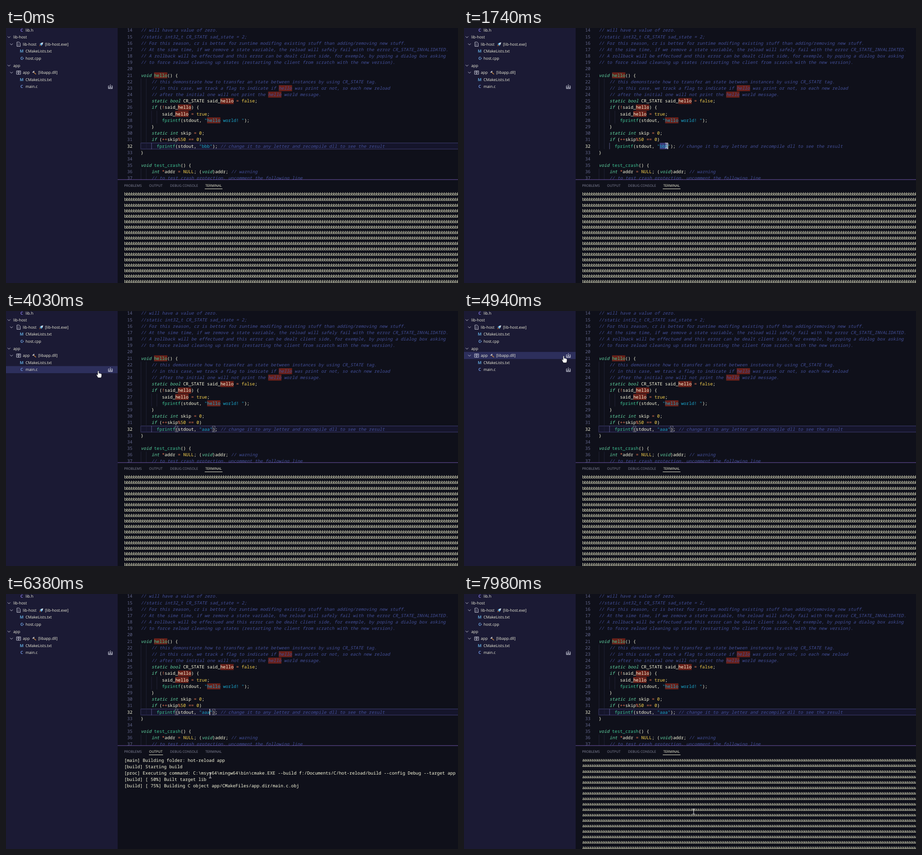
Animation, 996 px wide and 562 px high, one loop 8 s. Source, as an HTML page:

```html
<!DOCTYPE html>
<html lang="en">
<head>
<meta charset="utf-8">
<title>Hot reload</title>
<style>
html, body { margin: 0; width: 100%; height: 100%; overflow: hidden; background: #0f101a; }
svg { display: block; }
text { white-space: pre; text-rendering: geometricPrecision; }
.code { font: 9.747px "Noto Sans Mono", "DejaVu Sans Mono", monospace; fill: #fbfbdf; }
.term { font: 9.2px "Noto Sans Mono", "DejaVu Sans Mono", monospace; letter-spacing: -.556px; fill: #f6f6d2; }
.ui { font: 8.6px "Open Sans", "Noto Sans", sans-serif; fill: #f1f1dc; }
.tab { font: 7.5px "Open Sans", "Noto Sans", sans-serif; fill: #85879c; }
.tab.on { fill: #f6f6dc; }
.num { fill: #62668c; text-anchor: end; }
.num.on { fill: #f6f6dc; }
.com { fill: #434f98; font-style: italic; }
.key { fill: #62d8a4; font-style: italic; }
.fn { fill: #3fc796; }
.str { fill: #1ba6cc; }
.lit { fill: #f4d04e; }
.op { fill: #ee7a55; }
.line { fill: none; stroke: #d5d6e4; stroke-width: .9; }
.match { fill: none; stroke: #8b8ca0; stroke-width: .8; }
</style>
</head>
<body>
<svg id="stage" width="996" height="562" viewBox="0 0 996 562">
  <defs>
    <clipPath id="editorClip"><rect x="246" width="750" height="334"/></clipPath>
    <g id="build" class="line">
      <path d="M-2.5-1.5H-4.5V4.5H4.5V-1.5H2.5M0-5V1M-2-1L0 1.2L2-1M-4.5 2.2H4.5M-2.5 3.4H-1M1 3.4H2.5"/>
    </g>
  </defs>
</svg>
<script>
const LOOP = 8000, X0 = 297, CW = 5.848, LH = 14.17, SIDE = 246;
const svg = document.getElementById('stage');

function add(parent, tag, attrs = {}, text) {
  const el = document.createElementNS('http://www.w3.org/2000/svg', tag);
  for (const k in attrs) el.setAttribute(k, attrs[k]);
  if (text !== undefined) el.textContent = text;
  parent.appendChild(el);
  return el;
}
const rect = (p, x, y, width, height, attrs) => add(p, 'rect', { x, y, width, height, ...attrs });
const label = (p, cls, x, y, text) => add(p, 'text', { class: cls, x, y }, text);
const show = (el, on) => el.setAttribute('display', on ? 'inline' : 'none');
const place = (el, x, y) => el.setAttribute('transform', `translate(${x} ${y})`);
const colX = c => X0 + c * CW;
const lineTop = n => 253 + LH * (n - 32);

// ---- Editor ----
const source = `// will have a value of zero.
//static int32_t CR_STATE sad_state = 2;
// For this reason, cr is better for runtime modifing existing stuff than adding/removing new stuff.
// At the sime time, if we remove a state variable, the reload will safely fail with the error CR_STATE_INVALIDATED.
// A rollback will be effectued and this error can be dealt client side, for exemple, by poping a dialog box asking
// to force reload cleaning up states (restarting the client from scratch with the new version).

void hello() {
    // this demonstrate how to transfer an state between instances by using CR_STATE tag.
    // in this case, we track a flag to indicate if hello was print or not, so each new reload
    // after the initial one will not print the hello world message.
    static bool CR_STATE said_hello = false;
    if (!said_hello) {
        said_hello = true;
        fprintf(stdout, "hello world! ");
    }
    static int skip = 0;
    if (++skip%50 == 0)
      fprintf(stdout, "bbb"); // change it to any letter and recompile dll to see the result
}

void test_crash() {
    int *addr = NULL; (void)addr; // warning
    // to test crash protection, uncomment the following line`.split('\n');

const tokens = [
  ['com', /^\/\/.*/], ['str', /^"[^"]*"/], ['key', /^(void|static|bool|int|if)\b/],
  ['fn', /^\w+(?=\()/], ['lit', /^(true|false|NULL|\d+)\b/], ['op', /^[+%=!*]+/],
  ['', /^\w+/], ['', /^./]
];
function highlight(line, text) {
  while (text) {
    for (const [cls, re] of tokens) {
      const m = text.match(re);
      if (!m) continue;
      add(line, 'tspan', { class: cls }, m[0]);
      text = text.slice(m[0].length);
      break;
    }
  }
}

const editor = add(svg, 'g', { 'clip-path': 'url(#editorClip)' });
const active = rect(editor, X0, 0, 705, LH - .6, { fill: '#15152b', stroke: '#46437f', 'stroke-width': .9 });
const selection = rect(editor, colX(23), lineTop(32), CW * 3, LH, { fill: '#3b3a78' });
const nums = {};
source.forEach((raw, i) => {
  const n = 14 + i, y = lineTop(n), text = raw.trim(), indent = raw.length - raw.trimStart().length;
  for (let c = 0; c < indent; c += 2)
    rect(editor, colX(c), y, .8, LH, { fill: n === 32 && c === 4 ? '#6d6ca6' : '#25263d' });
  if (n < 30)
    for (const m of raw.matchAll(/hello/g))
      rect(editor, colX(m.index), y + .6, CW * 5, LH - 1, { fill: '#6a2019' });
  nums[n] = label(editor, 'code num', 278.6, y + 10.5, n);
  highlight(add(editor, 'text', { class: 'code', x: colX(indent), y: y + 10.5 }), text);
});
const typed = [...editor.querySelectorAll('.str')].pop();
const box = (c, n) => rect(editor, colX(c), lineTop(n) + .8, CW, LH - 1.6, { class: 'match' });
const braces = [box(13, 21), box(0, 33)];
const parens = [box(13, 32), box(27, 32)];
const caret = rect(editor, 0, 0, 1.3, LH - .6, { fill: '#ffffe8' });

// ---- Side bar ----
const side = add(svg, 'g');
rect(side, 0, 0, SIDE, 562, { fill: '#1b1a34' });
const hover = rect(side, 0, 0, SIDE, 15.6, { fill: '#2d2f5c' });
const tree = [
  ['lib.h', 43, 4.5, 'C', '#7d72d6'], ['lib-host', 16, 20], ['lib-host', 37, 35.6], ['[lib-host.exe]', 86, 35.6],
  ['CMakeLists.txt', 43, 51.2, 'M', '#5d9fd0'], ['host.cpp', 43, 66.9, 'C', '#6d9fdc'], ['app', 16, 82.5],
  ['app', 37, 98], ['[libapp.dll]', 71, 98], ['CMakeLists.txt', 43, 113.7, 'M', '#5d9fd0'], ['main.c', 43, 129.2, 'C', '#6d8fd8']
];
for (const [name, x, y, icon, fill] of tree) {
  label(side, 'ui', x, y + 3, name);
  if (icon) add(side, 'text', { class: 'ui', x: 34.5, y: y + 3.2, 'text-anchor': 'middle',
    style: `fill:${fill};font-weight:700;font-size:9px` }, icon);
}
add(side, 'path', { d: 'M36.2 67H39.2M37.7 65.5V68.5', stroke: '#6d9fdc' });
for (const [x, y] of [[6.5, 20], [12, 35.8], [6.5, 82.7], [12, 98.2]])
  add(side, 'path', { class: 'line', d: `M${x - 3} ${y - 1.5}l3 3l3-3` });
// binary file, rocket, book, hammer
add(side, 'path', { class: 'line', d: 'M24 31H29L31.5 33.5V40.5H24ZM26 34.5V36M28.5 34.5V36M26 37.5V39M28.5 37.5V39' });
add(side, 'path', { d: 'M74 36L77 33L82 31.5L80.5 36.5L77.5 39.5L77 37Z', fill: '#cfe0ec' });
add(side, 'path', { d: 'M74 36L77 33L78 35.5ZM77.5 39.5L80.5 36.5L77.5 36Z', fill: '#2d95d8' });
add(side, 'path', { d: 'M73.5 40L75 37L76.5 38.5Z', fill: '#ee8b37' });
add(side, 'path', { class: 'line', d: 'M23.2 94.5H27.7V102H23.2ZM27.7 94.5H32.3V102H27.7ZM24.5 96.5H26.3M24.5 98.5H26.3M29.2 96.5H31M29.2 98.5H31' });
add(side, 'path', { d: 'M60.5 97L66 102', stroke: '#c98a45', 'stroke-width': 1.6 });
add(side, 'path', { d: 'M58 97.5L61.5 94.2L63 95.7L59.5 99Z', fill: '#c3c6cc' });
const appBuild = add(side, 'use', { href: '#build', transform: 'translate(230 98)' });
add(side, 'use', { href: '#build', transform: 'translate(230 129.2)' });

// ---- Panel ----
const panel = add(svg, 'g');
rect(panel, SIDE, 333.6, 750, 1, { fill: '#7058ad' });
const tabs = [['PROBLEMS', 260.3], ['OUTPUT', 315.3], ['DEBUG CONSOLE', 361.6], ['TERMINAL', 439.2]]
  .map(([s, x]) => label(panel, 'tab', x, 350, s));
const underline = rect(panel, 0, 354, 0, 1, { fill: '#e9e9cf' });

const terminal = add(panel, 'g');
const rows = Array.from({ length: 17 }, (_, i) => label(terminal, 'term', 260.4, 369.4 + i * 12.06, ''));

const log = [
  [5480, '[main] Building folder: hot-reload app'],
  [5480, '[build] Starting build'],
  [5690, '[proc] Executing command: C:\\msys64\\mingw64\\bin\\cmake.EXE --build f:/Documents/C/hot-reload/build --config Debug --target app'],
  [6040, '[build] [ 50%] Built target lib'],
  [6380, '[build] [ 75%] Building C object app/CMakeFiles/app.dir/main.c.obj'],
  [6520, '[build] [100%] Linking C shared library bin\\Windows\\Debug\\libapp.dll'],
  [6660, '[build] [100%] Built target app'],
  [6730, '[build] Build finished with exit code 0']
].map(([at, s], i) => ({ at, el: label(panel, 'code', 260.4, 369.6 + i * 14.14, s) }));

const tip = add(svg, 'g');
rect(tip, 422, 315, 73, 17, { fill: '#25284f' });
add(tip, 'text', { class: 'ui', x: 428, y: 326.6, style: 'font-size:7.9px' }, 'Terminal (Ctrl+`)');

// ---- Pointer ----
const beam = add(svg, 'path', { d: 'M-2.8-5.6H-.7L0-5L.7-5.6H2.8M0-5V5M-2.8 5.6H-.7L0 5L.7 5.6H2.8', fill: 'none', stroke: '#f4f4f4' });
const arrow = add(svg, 'path', { d: 'M0 0V12L2.8 9.4L4.6 13.4L6.3 12.6L4.5 8.7H8.2Z', fill: '#fff', stroke: '#111', 'stroke-width': .7 });
const hand = add(svg, 'path', {
  d: 'M-1.2 1Q0-1 1.2 1V5.2Q2.6 4.4 3.4 5.6Q5 5 5.6 6.2Q7.3 6 7.4 7.6V11Q7 13 6 15H-.5Q-2 12.5-3.4 10Q-4.4 8-3 7.6Q-2 7.8-1.2 9.4Z',
  fill: '#fff', stroke: '#111', 'stroke-width': .6
});
const path = [
  [370, 500, 549], [980, 467, 276], [1120, 464, 291], [1190, 460, 287], [1330, 441, 259], [1530, 441, 259],
  [1880, 449, 259], [2080, 449, 259], [2280, 447, 279], [3620, 447, 279], [3880, 202, 149], [3970, 202, 149],
  [4150, 206, 99], [4800, 204, 99], [4940, 219.5, 99], [5280, 230.5, 98], [5620, 230.5, 98], [6040, 450, 400],
  [6380, 450, 400], [6660, 462, 348.5], [7220, 462, 348.5], [7380, 460, 335], [7980, 506, 479.5]
];
function pointerAt(t) {
  const i = path.findIndex(p => p[0] > t);
  if (i < 0) return path[path.length - 1].slice(1);
  const [a, ax, ay] = path[i - 1], [b, bx, by] = path[i], k = (t - a) / (b - a);
  return [ax + (bx - ax) * k, ay + (by - ay) * k];
}

// Caret blinks from the latest key press or click.
const resets = [980, 1600, 2680, 2950, 3150];
function caretOn(t) {
  const last = resets.filter(r => r <= t).pop();
  return last !== undefined && t < 7000 && Math.floor((t - last) / 515) % 2 === 0;
}

function drawPointer(t) {
  const [x, y] = t < 370 ? [-50, -50] : pointerAt(t);
  const inSide = x >= 0 && x < SIDE, onRow = inSide && y < 137;
  const row = Math.floor((y - 90.2) / 15.6);
  const isHand = onRow || (x > 260 && x < 480 && y > 340 && y < 355);
  const isArrow = inSide && !onRow;
  show(hover, onRow);
  hover.setAttribute('y', 90.2 + row * 15.6);
  show(appBuild, onRow && row === 0);
  show(hand, isHand);
  show(arrow, isArrow);
  show(beam, !isHand && !isArrow);
  for (const el of [hand, arrow, beam]) place(el, x, y);
}

function draw(t) {
  const current = t >= 980 && t < 1530 ? 33 : 32;
  const selected = t >= 1600 && t < 2680;
  const word = t < 2680 ? 'bbb' : t < 2950 ? 'a' : t < 3150 ? 'aa' : 'aaa';
  const output = t >= 5480 && t < 7140;

  typed.textContent = `"${word}"`;
  active.setAttribute('y', lineTop(current) + .3);
  show(active, !selected);
  show(selection, selected);
  for (const n of [32, 33]) nums[n].classList.toggle('on', n === current);
  braces.forEach(b => show(b, current === 33));
  parens.forEach(b => show(b, t >= 2750 && t < 7000));
  parens[1].setAttribute('x', colX(24 + word.length));
  caret.setAttribute('x', colX(current === 33 ? 1 : 23 + word.length) - .6);
  caret.setAttribute('y', lineTop(current) + .3);
  show(caret, caretOn(t));

  tabs.forEach((el, i) => el.classList.toggle('on', i === (output ? 1 : 3)));
  underline.setAttribute('x', output ? 315 : 438);
  underline.setAttribute('width', output ? 31 : 39);
  show(terminal, !output);
  const fill = (t < 7140 ? 'b' : 'a').repeat(150);
  if (rows[0].textContent !== fill) rows.forEach(r => r.textContent = fill);
  log.forEach(l => show(l.el, output && t >= l.at));
  show(tip, t >= 6940 && t < 7140);
  drawPointer(t);
}

const start = performance.now();
(function frame() {
  draw((performance.now() - start) % LOOP);
  requestAnimationFrame(frame);
})();
</script>
</body>
</html>
```
